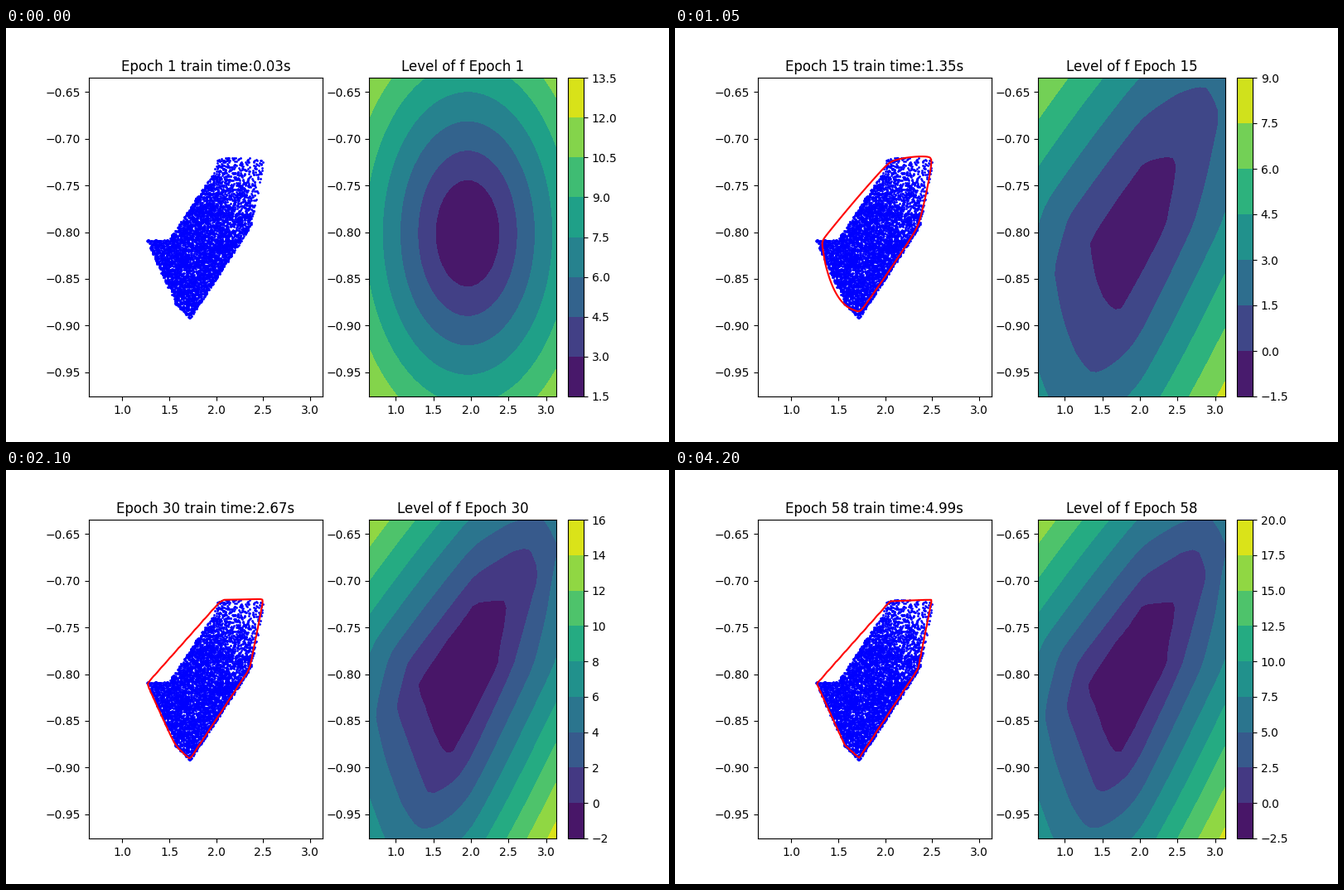
A matplotlib script that plays this animation: 800x500 px, repeating every 4.55 s.

```python
import numpy as np
import matplotlib.pyplot as plt
from matplotlib.animation import FuncAnimation
from matplotlib.path import Path

XLIM = (0.6437, 3.1315)
YLIM = (-0.9761, -0.6345)

# Panel extents in stage pixels
LEFT = (100, 381.82)
RIGHT = (438.18, 663.64)
ROWS = (60, 445)

EPOCHS = [1, *range(5, 56, 5), 58]
TIMES = {1: 0.03, 10: 0.91, 20: 1.8, 30: 2.67, 40: 3.58, 50: 4.33,
         55: 4.7, 58: 4.99}

# Colour scale from each epoch on: lowest level, highest level, bands
SCALES = {1: (1.5, 13.5, 8), 5: (-0.025, 0.175, 8), 10: (-0.4, 2.4, 7),
          15: (-1.5, 9, 7), 20: (-2, 14, 8), 25: (-2, 16, 9),
          35: (-2.5, 17.5, 8), 45: (-2.5, 20, 9)}

# Corners of the learned level sets, in pixels of the right panel
CENTER = (553, 250)
HULL = [(495, 258), (566, 158), (606, 157), (593, 240), (536, 348),
        (522, 332)]
MIDDLE = [(470, 288), (484, 232), (564, 128), (614, 95), (632, 91),
          (644, 125), (612, 238), (561, 349), (546, 372), (517, 392),
          (508, 391)]
OUTER = [(560, -35), (475, 66), (390, 185), (360, 300), (370, 440),
         (410, 550), (490, 585), (565, 530), (620, 437), (725, 225),
         (750, 100), (735, -30), (650, -85)]


def bowl(x, y, center, width, height, lean, slope, rim):
    """Cone over a leaning ellipse, with value rim on the ellipse."""
    u = (x - center[0]) / width
    v = (center[1] - y) / height
    k = np.sqrt((u**2 - 2 * lean * u * v + v**2) / (1 - lean**2))
    return rim + slope * (k - 1)


def gauge(corners, x, y, power):
    """1 on the rounded convex polygon, growing linearly from CENTER."""
    p = np.array(corners, float) - CENTER
    edge = np.roll(p, -1, 0) - p
    normal = np.c_[edge[:, 1], -edge[:, 0]]
    normal /= (normal * p).sum(1)[:, None]
    sides = np.array([a * (x - CENTER[0]) + b * (y - CENTER[1])
                      for a, b in normal])
    top = sides.max(0) + 1e-9
    blend = (np.clip(sides / top, 0, 1) ** power).sum(0)
    return top * (blend / 2) ** (1 / power)


def polygons(epoch, x, y):
    """Linear interpolation along rays between the nested polygons."""
    knots = [20, 30, 40, 58]
    rings = [
        (HULL, 0, 25 * np.exp((epoch - 20) / 18)),
        (MIDDLE, np.interp(epoch, knots, [1.5, 2.05, 2.5, 2.65]), 60),
        (OUTER, np.interp(epoch, knots, [9.8, 10.9, 12.5, 13.4]), 60),
    ]
    r = np.hypot(x - CENTER[0], y - CENTER[1])
    f, r0, v0 = np.zeros_like(r), 0, -1.8
    for corners, v1, power in rings:
        r1 = r / gauge(corners, x, y, power)
        f = np.where(r >= r0, v0 + (v1 - v0) * (r - r0) / (r1 - r0), f)
        r0, v0 = r1, v1
    return f


def field(epoch, x, y):
    if epoch == 1:
        return bowl(x, y, (557, 248), 39, 65, 0, 2.75, 3)
    if epoch == 5:
        return bowl(x, y, (552, 250), 90, 125, 0.22, 0.12, 0)
    if epoch >= 20:
        return polygons(epoch, x, y)
    w = (epoch - 10) / 10
    early = bowl(x, y, (550, 252), 55, 95, 0.8, 0.43, 0)
    return (1 - w) * early + w * polygons(20, x, y)


def grid(n):
    px, py = np.meshgrid(np.linspace(*RIGHT, n), np.linspace(*ROWS, n))
    x, y = np.meshgrid(np.linspace(*XLIM, n), np.linspace(*YLIM[::-1], n))
    return px, py, x, y


def make_cloud():
    """Points in a bent outline, thinning out to the upper right."""
    rng = np.random.default_rng(4)
    outline = Path([(169, 256), (196, 256), (252, 172), (255, 156),
                    (312, 156), (303, 203), (295, 241), (222, 351),
                    (205, 334)])
    pts = rng.uniform((169, 156), (312, 350), (14000, 2))
    x, y = pts.T
    keep = np.clip(1 - 0.008 * (x - y - 20), 0.22, 1)
    pts = pts[outline.contains_points(pts) & (rng.random(len(pts)) < keep)]
    return (np.interp(pts[:, 0], LEFT, XLIM),
            np.interp(pts[:, 1], ROWS, YLIM[::-1]))


CLOUD = make_cloud()
FINE, COARSE = grid(160), grid(30)

fig = plt.figure(figsize=(8, 5), dpi=100)


def draw(i):
    epoch = EPOCHS[i]
    seconds = round(float(np.interp(epoch, list(TIMES), list(TIMES.values()))),
                    2)
    fig.clear()
    left, right = fig.subplots(1, 2)

    left.scatter(*CLOUD, s=1, c="blue")
    if epoch > 1:
        px, py, x, y = FINE
        left.contour(x, y, field(epoch, px, py), levels=[0], colors="red")
    left.set_title(f"Epoch {epoch} train time:{seconds}s")

    low, high, bands = SCALES[max(k for k in SCALES if k <= epoch)]
    edge = (high - low) * 1e-4
    px, py, x, y = COARSE
    f = np.clip(field(epoch, px, py), low + edge, high - edge)
    filled = right.contourf(x, y, f, levels=np.linspace(low, high, bands + 1))
    fig.colorbar(filled, ax=right)
    right.set_title(f"Level of f Epoch {epoch}")

    for ax in (left, right):
        ax.set_xlim(XLIM)
        ax.set_ylim(YLIM)
    return []


anim = FuncAnimation(fig, draw, frames=len(EPOCHS), interval=350, repeat=True,
                     repeat_delay=0)
plt.show()
```
